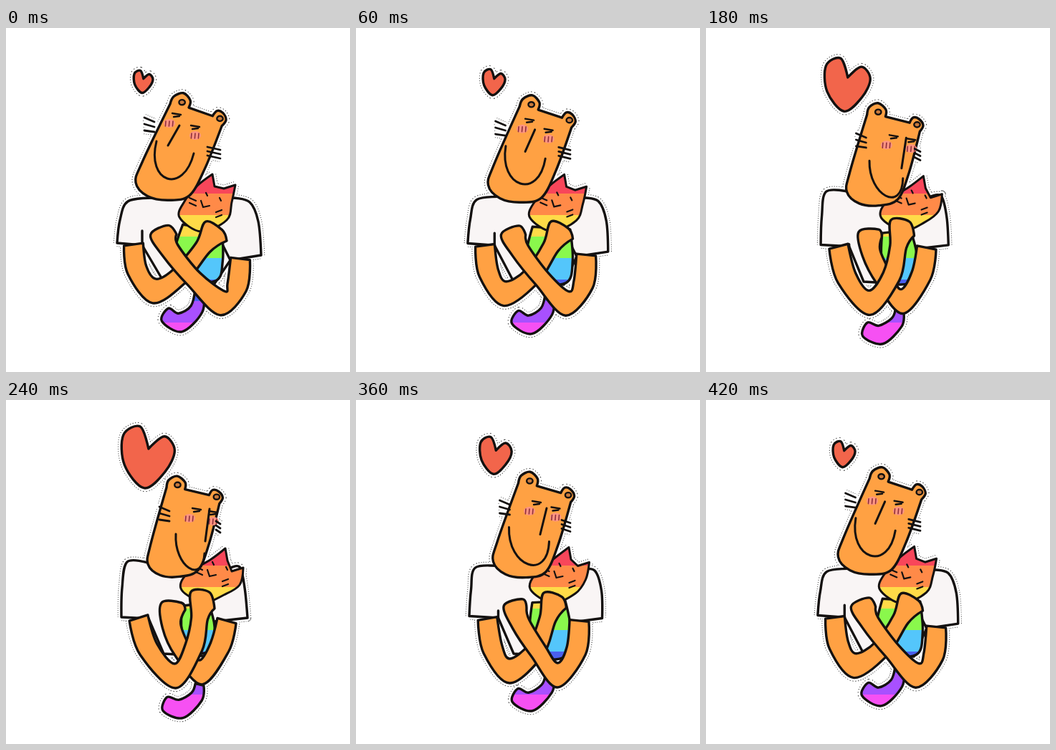
Animation, 480 px wide and 480 px high, one loop 480 ms. Source, as an HTML page:

```html
<!DOCTYPE html>
<html lang="en">
<head>
<meta charset="utf-8">
<title>Hug</title>
<style>
html, body { margin: 0; width: 100%; height: 100%; overflow: hidden; background: #fff; }
svg { display: block; width: 100%; height: 100%; }
path { stroke-linecap: round; stroke-linejoin: round; }
</style>
</head>
<body>
<svg id="stage" viewBox="0 0 480 480"></svg>
<script>
const STEP = 60, STEPS = 8;
const INK = '#141110', SKIN = '#ffa143', RAINBOW = 'url(#rainbow)';
const BANDS = ['#f8465a', '#ff8a48', '#ffdb48', '#8af84c', '#54c6fb', '#4a60ee', '#a850ff', '#f650f3'];

const svg = document.getElementById('stage');
function add(tag, attrs, parent = svg) {
  const el = document.createElementNS('http://www.w3.org/2000/svg', tag);
  for (const k in attrs) el.setAttribute(k, attrs[k]);
  return parent.appendChild(el);
}

const grad = add('linearGradient', {
  id: 'rainbow', gradientUnits: 'userSpaceOnUse', x1: 0, x2: 0, y1: 201, y2: 441
}, add('defs', {}));
BANDS.forEach((c, i) => [i, i + 1].forEach(n =>
  add('stop', { offset: n / BANDS.length, 'stop-color': c }, grad)));

const layer = (fill, width = 3.4, stroke = INK) =>
  add('path', { fill, stroke, 'stroke-width': width });

const edge = layer('none', 10.5, '#444');
edge.setAttribute('stroke-dasharray', '1 2');
edge.style.strokeLinecap = 'butt';

const el = {
  edge,
  rim: layer('#fff', 8.5, '#fff'),
  shirt: layer('#f9f5f5'),
  seams: layer('none'),
  tail: layer(RAINBOW),
  body: layer(RAINBOW),
  cat: layer(RAINBOW, 3),
  catFace: layer('none', 2.2),
  armBack: layer(SKIN),
  armFront: layer(SKIN),
  head: layer(SKIN),
  ears: layer('#c87a3c', 2.4),
  cheeks: layer('#ff9482', 0, 'none'),
  marks: layer('none', 1.6, '#8c2f3a'),
  face: layer('none', 3),
  eyes: layer('none', 2.4),
  whiskers: layer('none', 2.8),
  heart: layer('#f2654b')
};

// Squeeze of the hug: 0 is loose, 1 is tight.
let q = 0;
const mix = (a, b, k) => a + (b - a) * k;

// Joint moving from (x0,y0) to (x1,y1), bowed by (bx,by) halfway.
function at(x0, y0, x1, y1, bx = 0, by = 0) {
  const bow = 4 * q * (1 - q);
  return { x: mix(x0, x1, q) + bx * bow, y: mix(y0, y1, q) + by * bow };
}
const off = (p, x, y) => ({ x: p.x + x, y: p.y + y });
const hard = p => ({ ...p, hard: true });
const line = (p, x0, y0, x1, y1) => `M${p.x + x0},${p.y + y0}L${p.x + x1},${p.y + y1}`;
const oval = (p, rx, ry) =>
  `M${p.x - rx},${p.y}a${rx},${ry} 0 1 0 ${2 * rx},0a${rx},${ry} 0 1 0 ${-2 * rx},0Z`;

// Smooth closed curve through the points, breaking at hard ones.
function blob(pts) {
  const n = pts.length;
  const get = i => pts[(i + n) % n];
  const handle = (i, dir) => {
    const p = get(i), a = get(i - 1), b = get(i + 1);
    const k = p.hard ? 0 : dir / 6;
    return `${p.x + k * (b.x - a.x)},${p.y + k * (b.y - a.y)}`;
  };
  return pts.reduce((d, p, i) => {
    const to = get(i + 1);
    return d + `C${handle(i, 1)} ${handle(i + 1, -1)} ${to.x},${to.y}`;
  }, `M${pts[0].x},${pts[0].y}`) + 'Z';
}

// Limb of varying half-width around a centre line, with an optional thumb.
function limb(joints, widths, thumb) {
  const last = joints.length - 1;
  const side = dir => joints.map((p, i) => {
    const a = joints[Math.max(0, i - 1)], b = joints[Math.min(last, i + 1)];
    const k = dir * widths[i] / Math.hypot(b.x - a.x, b.y - a.y);
    return { ...off(p, -k * (b.y - a.y), k * (b.x - a.x)), hard: i === 0 };
  });
  const right = side(1);
  if (thumb) right.splice(last, 0, hard(thumb));
  return blob([...right, ...side(-1).reverse()]);
}

function arms() {
  const armL = limb([
    at(178, 302, 185, 304, 2, 2), at(183, 338, 199, 348, 0, 5), at(207, 367, 236, 385, -7, 2),
    at(242, 346, 262, 345, -1, 3), at(275, 306, 270, 305, -5), at(290, 276, 271, 268, -6)
  ], [13.5, 14, 17, 12.5, 11.5, 13], at(308, 297, 291, 291, -6, -4));
  const armR = limb([
    at(327, 322, 308, 308, -6, -7), at(322, 362, 298, 345, -3, -3), at(302, 384, 272, 380, -6, 2),
    at(262, 350, 246, 350), at(229, 310, 231, 315), at(214, 282, 231, 283, -3)
  ], [13.5, 14, 17, 12, 13, 14], at(238, 288, 250, 293, -6));
  return { armL, armR };
}

function shirt() {
  const cuffL = at(190, 303, 199, 305, 4), cuffR = at(313, 324, 292, 309, -4, -6);
  const slack = 20 * (1 - q);
  return {
    shirt: blob([
      hard(at(155, 300, 161, 303)), at(159, 268, 162, 262), at(170, 242, 169, 226, -3),
      hard(at(206, 237, 198, 227)), hard(at(315, 237, 310, 236)),
      at(340, 243, 326, 233), at(352, 270, 333, 262), hard(at(356, 317, 337, 304, -3, -6)),
      hard(cuffR), hard({ x: 290, y: 358 }), hard({ x: 220, y: 354 }), hard(cuffL)
    ]),
    seams: line(cuffL, 0, -slack, 0, 0) + line(cuffR, -slack / 2, -slack, 0, 0)
  };
}

function cat() {
  const tipL = at(288, 204, 306, 207), tipR = at(320, 219, 331, 234);
  const jaw = at(242, 264, 245, 265), mouth = at(275, 248, 284, 244);
  const girth = mix(1.15, .77, q);
  return {
    tail: limb([at(270, 364, 270, 397, 0, 5), at(266, 392, 266, 414), at(243, 411, 244, 431), at(222, 400, 222, 424)],
      [6, 9, 13, 10]),
    body: limb([at(274, 278, 264, 285), at(268, 322, 268, 318, 3, 3), at(267, 352, 270, 350, 3, 7)],
      [24, 30, 22].map(w => w * girth)),
    cat: blob([
      off(tipL, -21, 16), hard(tipL), hard(off(tipL, 3, 17)), hard(off(tipR, -16, 5)), hard(tipR),
      off(tipR, -5, 24), at(308, 268, 304, 272), at(272, 284, 276, 282), jaw, off(jaw, 7, -22)
    ]),
    catFace: line(mouth, 4, -18, 6, -14) + line(mouth, 23, -11, 25, -7) +
      line(mouth, -3, -7, 0, 2) + line(mouth, 0, 2, 9, 0) +
      [0, 7].map(y => line(mouth, -19, y - 11, -10, y - 7) + line(mouth, 18, y + 9, 26, y + 6)).join('')
  };
}

function head() {
  const tl = at(229, 106, 224, 122, 0, 2), tr = at(303, 132, 299, 140, 0, 2);
  const bl = at(172, 222, 191, 236, 2, 3), br = at(256, 250, 270, 252, 3, 5);
  const uv = (u, v) => ({
    x: mix(mix(tl.x, tr.x, u), mix(bl.x, br.x, u), v),
    y: mix(mix(tl.y, tr.y, u), mix(bl.y, br.y, u), v)
  });
  const a = at(210, 158, 237, 187, -10, 5), b = at(225, 210, 255, 234, 0, 7), c = at(262, 175, 277, 214, 0, 3);
  const dx = (b.x - (a.x + c.x) / 2) * 4 / 3, dy = (b.y - (a.y + c.y) / 2) * 4 / 3;
  const nose = at(242, 136, 284, 152, 3, 7), tip = at(226, 164, 278, 197, 5, 7);
  const cheekL = at(228, 133, 256, 165, 0, 6), cheekR = at(264, 150, 289, 169, 2, 4);
  const cheeks = [cheekL, cheekR];
  const whiskL = at(200, 136, 221, 160, -3, 3), whiskR = at(290, 174, 296, 177);
  const reach = mix(9, 3, q);
  return {
    head: blob([
      hard(uv(0, 0)), uv(0, -.09), uv(.13, -.16), uv(.3, -.11), hard(uv(.33, -.03)),
      hard(uv(.78, -.03)), uv(.82, -.1), uv(.93, -.1), uv(1.03, -.04), hard(uv(1, .04)),
      uv(1, .55), uv(.93, .88), uv(.65, 1), uv(.32, 1.03), uv(.06, .93), uv(.01, .7)
    ]),
    ears: oval(uv(.18, -.06), 4.2, 3.6) + oval(uv(.92, -.03), 4.2, 3.6),
    face: `M${a.x},${a.y}C${a.x + dx},${a.y + dy} ${c.x + dx},${c.y + dy} ${c.x},${c.y}` +
      `M${nose.x},${nose.y}L${tip.x},${tip.y}`,
    cheeks: cheeks.map(p => oval(p, 8, 6)).join(''),
    marks: cheeks.map(p => [-5, 0, 5].map(x => line(p, x, -3, x - .6, 4)).join('')).join(''),
    eyes: [off(cheekL, 10, -13), off(cheekR, 0, -13)]
      .map(p => line(p, -6, -1, 6, 1) + line(p, -4, 4, 4, 3)).join(''),
    whiskers: [-1, 0, 1].map(i =>
      line(whiskL, -7, 8 * i - 2 + i, 7, 8 * i + 2 - i) +
      line(whiskR, -reach, 6 * i - 2, reach, 6 * i + 2)).join('')
  };
}

function heart() {
  const size = 15.5 * Math.pow(2.77, q), mid = at(191.5, 75, 198, 80);
  const p = (x, y) => off(mid, x * size, y * size);
  return {
    heart: blob([
      hard(p(.02, -.28)), p(-.25, -1), p(-.8, -.72), p(-.76, .25),
      p(-.12, 1), p(.55, .48), p(.87, -.22), p(.54, -.68)
    ])
  };
}

function draw(ms) {
  const step = Math.floor(ms / STEP) % STEPS;
  q = (1 - Math.cos(2 * Math.PI * step / STEPS)) / 2;
  const d = { ...shirt(), ...cat(), ...arms(), ...head(), ...heart() };
  [d.armBack, d.armFront] = q > .6 ? [d.armR, d.armL] : [d.armL, d.armR];
  d.edge = d.rim = d.tail + d.shirt + d.body + d.cat + d.armL + d.armR + d.head + d.whiskers + d.heart;
  for (const name in el) el[name].setAttribute('d', d[name]);
}

const start = performance.now();
function tick(now) {
  draw(Math.max(0, now - start));
  requestAnimationFrame(tick);
}
draw(0);
requestAnimationFrame(tick);
</script>
</body>
</html>
```
